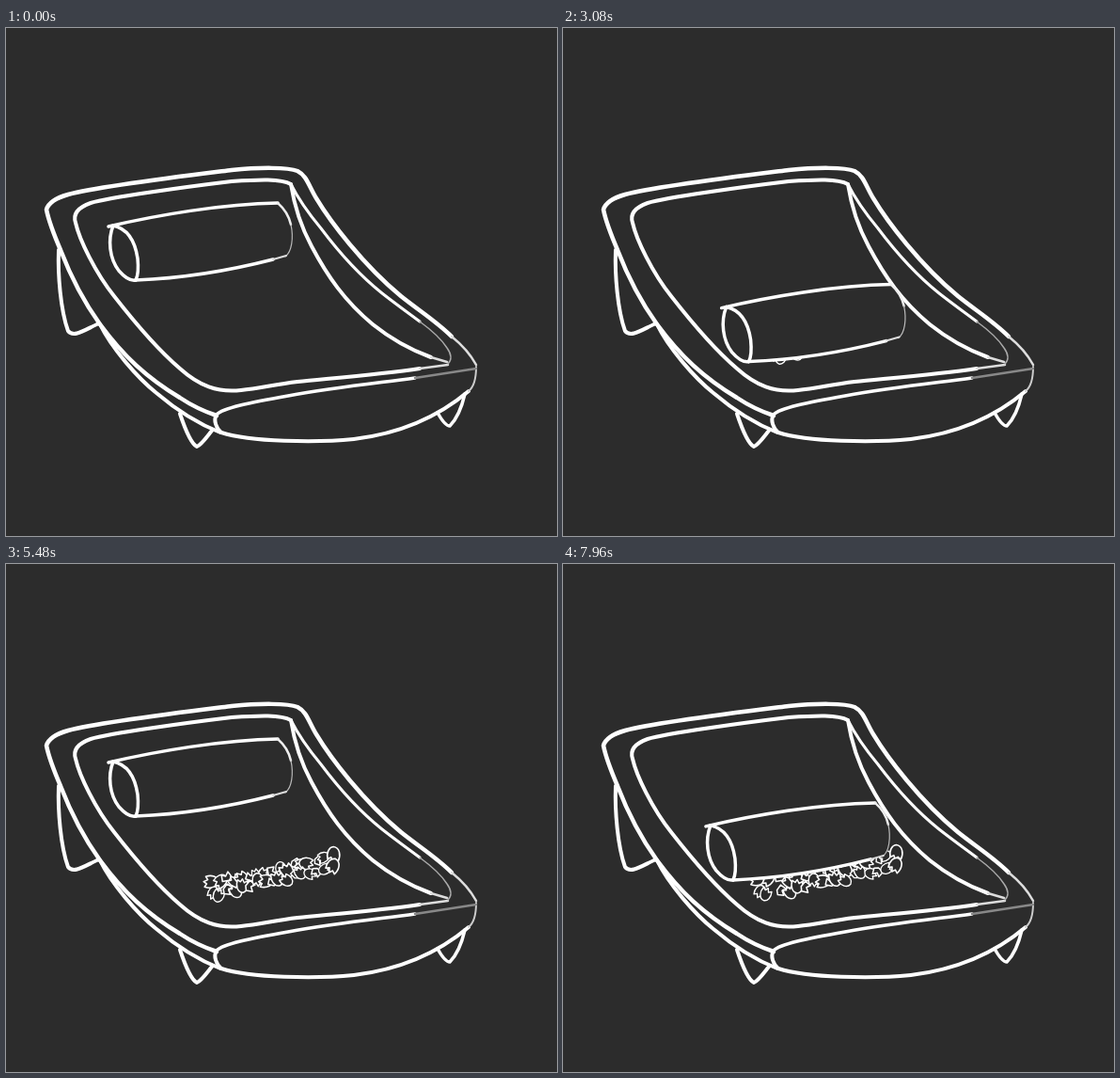
These frames come from a looping animation (586x540 px, 8000 ms). An HTML page with a canvas:

```html
<!DOCTYPE html>
<html lang="en">
<head>
<meta charset="utf-8">
<title>Grinding stone</title>
<style>
html, body { margin: 0; overflow: hidden; background: #2c2c2c; }
canvas { display: block; width: 586px; height: 540px; }
</style>
</head>
<body>
<canvas id="stage" width="586" height="540"></canvas>
<script>
const ctx = document.getElementById('stage').getContext('2d');
const BG = '#2c2c2c', LOOP = 8000, STEP = 40;
const P = d => new Path2D(d);

// Each entry: line width, colour, outline
const stone = [
  [4.5, '#fff', P('M224 412C212 408 200 403 185 393C150 372 125 349 100 315C82 290 68 262 58 236C52 222 46 208 43 193C45 186 52 181 66 177C100 168 200 156 240 151C270 148 300 148 310 152C320 157 322 168 330 181C345 206 380 252 420 285C440 301 458 312 474 328')],
  [2.5, '#ddd', P('M474 328C484 336 494 347 500 358')],
  [4, '#fff', P('M100 315C112 340 140 372 160 388C180 405 205 421 228 430')],
  [4, '#fff', P('M224 411C220 417 224 426 229 430C260 440 330 441 370 437C420 431 460 413 492 386')],
  [2, '#ccc', P('M492 386C497 382 500 372 500 360')],
  [3.5, '#fff', P('M224 411C230 404 260 398 300 391C350 382 390 378 435 372')],
  [2.5, '#888', P('M435 372L500 362')],
  [4, '#fff', P('M303 166C292 160 270 161 240 163C190 169 110 180 90 186C76 191 71 198 74 207C78 225 95 260 115 285C140 317 165 345 185 362C205 380 225 388 250 385C270 383 285 379 310 376C350 372 400 368 440 362')],
  [2.5, '#ddd', P('M440 362L470 358')],
  [3, '#fff', P('M303 166C310 180 320 195 335 213C350 233 370 258 400 282C414 293 428 303 440 312')],
  [1.5, '#aaa', P('M440 312C455 323 464 332 469 340C474 347 474 353 470 357')],
  [4, '#fff', P('M303 166C306 185 312 208 325 232C342 264 360 290 390 315C410 331 430 342 452 350')],
  [2.5, '#ddd', P('M452 350L469 355')],
  [4, '#fff', P('M56 236C55 262 58 300 66 322C72 330 85 320 99 314')],
  [4, '#fff', P('M185 410C190 425 197 442 203 445C208 443 214 434 219 428')],
  [3.5, '#fff', P('M459 409C464 418 468 423 472 423C479 416 485 402 488 389')]
];
const rollerFill = P('M112 210C160 199 230 187 289 186C300 195 305 210 305 225C304 235 302 240 297 243C250 255 190 266 138 268C128 268 102 250 112 210Z');
const roller = [
  [3.5, '#fff', P('M109 211C160 199 230 187 289 186')],
  [2.5, '#eee', P('M289 186C297 193 301 200 303 209')],
  [1.2, '#bbb', P('M303 209C306 223 304 238 297 243')],
  [3.5, '#fff', P('M138 268C190 266 245 256 284 246')],
  [2, '#ddd', P('M284 246L298 242')],
  [3.5, '#fff', P('M114 210C108 225 110 245 120 258C127 266 133 269 138 268')],
  [3.5, '#fff', P('M114 210C128 213 137 225 140 245C141 255 141 262 138 268')]
];

// Resting beans: x, y, tilt in degrees
const beans = [
  [272, 316, 70], [283, 309, 30], [299, 305, 75], [310, 307, 40], [291, 312, 5],
  [319, 312, 35], [303, 316, 100], [251, 315, 20], [238, 320, 120], [328, 325, 10],
  [320, 317, 110], [312, 326, 0], [276, 331, 60], [265, 320, 30], [243, 330, 70],
  [228, 337, 15], [233, 345, 160], [248, 346, 80], [282, 338, 150], [264, 337, 150],
  [253, 327, 125], [304, 331, 160], [293, 334, 170], [290, 324, 35], [258, 332, 30]
];
const bean = new Path2D();
bean.ellipse(0, 0, 9.5, 6.5, 0, 0, 7);
const shard = P('M-8 1C-8 -5 -1 -7 5 -5L3 -2 6 0 2 2 4 5C-2 7 -7 5 -8 1Z');
const chip = P('M-5 2L-3 -4 0 -1 4 -4 5 2 1 4Z');

// Roller travel along the hollow of the stone
const track = [[0, 0], [43, 68], [60, 87], [77, 94], [100, 98], [125, 100]];
const strokes = [
  [1990, 0], [2725, 1], [3270, .465], [3820, 1], [4250, .465], [4680, 1],
  [5475, 0], [5570, 0], [6460, 1], [6960, .465], [7460, 1], [7960, .465], [8460, 1]
];
const dist = (a, b) => Math.hypot(b[0] - a[0], b[1] - a[1]);
const mix = (a, b, k) => a + (b - a) * k;
const clamp = v => Math.max(0, Math.min(1, v));
const noise = i => { const v = Math.sin(i * 127.1 + 3) * 43758.5; return v - Math.floor(v); };
const trackLength = track.slice(1).reduce((sum, p, i) => sum + dist(track[i], p), 0);

function along(s) {
  let left = s * trackLength;
  for (let i = 1; i < track.length; i++) {
    const a = track[i - 1], b = track[i], d = dist(a, b);
    if (left <= d) return [mix(a[0], b[0], left / d), mix(a[1], b[1], left / d)];
    left -= d;
  }
  return track[track.length - 1];
}

function rollerPlace(t) {
  if (t <= strokes[0][0]) return [0, 0];
  const i = strokes.findIndex(k => k[0] > t);
  const [t0, a] = strokes[i - 1], [t1, b] = strokes[i];
  return along(mix(a, b, (1 - Math.cos(Math.PI * (t - t0) / (t1 - t0))) / 2));
}

function drawLines(list) {
  for (const [width, colour, path] of list) {
    ctx.lineWidth = width;
    ctx.strokeStyle = colour;
    ctx.stroke(path);
  }
}

function drawAt(path, x, y, angle, width, scale = 1) {
  ctx.save();
  ctx.translate(x, y);
  ctx.rotate(angle);
  ctx.scale(scale, scale);
  ctx.fillStyle = BG;
  ctx.fill(path);
  ctx.lineWidth = width;
  ctx.strokeStyle = '#fff';
  ctx.stroke(path);
  ctx.restore();
}

function drawBeans(t) {
  const n = beans.length;
  beans.forEach(([x, y, tilt], i) => {
    const order = (i * 7 + 12) % n;
    const start = 215 + order * 22;
    const u = clamp((t - start) / 400), v = clamp((t - start - 400) / 470);
    const top = order ? -14 : -8;
    const dropX = order ? 278 + (x - 278) * .7 : 262;
    const hop = Math.sin(Math.PI * v) * (1 - v);
    const px = mix(dropX, x, u) + (x - 278) * .5 * hop;
    const py = mix(top, y, u * u) - 12 * Math.abs(Math.sin(2 * Math.PI * v)) * (1 - v);
    const spin = (1 - u) * 3 * (noise(i) - .5) + hop;
    drawAt(bean, px, py, tilt * Math.PI / 180 + (order ? spin : 0), 1.8);
  });
}

function drawCrushed(t) {
  const spread = t < 4960 ? .82 : t < 6080 ? .92 : 1;
  const nudge = t > 7460 ? -6 : 0;
  for (let i = 0; i < 34; i++) {
    const row = i < 17 ? 1 : 0, col = i % 17;
    const x = 213 + col * 8.7 + (noise(i) - .5) * 5;
    const y = 352 - (x - 213) * .215 - row * 12 + (noise(i + 50) - .5) * 7;
    const shift = col < 2 ? nudge : 0;
    const px = mix(278, x, spread) + shift, py = mix(333, y, spread) + shift * .5;
    drawAt(col % 3 === 2 ? chip : shard, px, py, noise(i + 90) * 6.3, 1.4, .9 + .25 * noise(i + 20));
  }
}

function draw(t) {
  ctx.fillStyle = BG;
  ctx.fillRect(0, 0, 586, 540);
  drawLines(stone);
  if (t < 3080) drawBeans(t); else drawCrushed(t);
  ctx.save();
  ctx.translate(...rollerPlace(t));
  ctx.fillStyle = BG;
  ctx.fill(rollerFill);
  drawLines(roller);
  ctx.restore();
}

ctx.lineCap = ctx.lineJoin = 'round';
const begin = performance.now();
function frame() {
  const t = (performance.now() - begin) % LOOP;
  draw(Math.floor(t / STEP) * STEP);
  requestAnimationFrame(frame);
}
frame();
</script>
</body>
</html>
```
